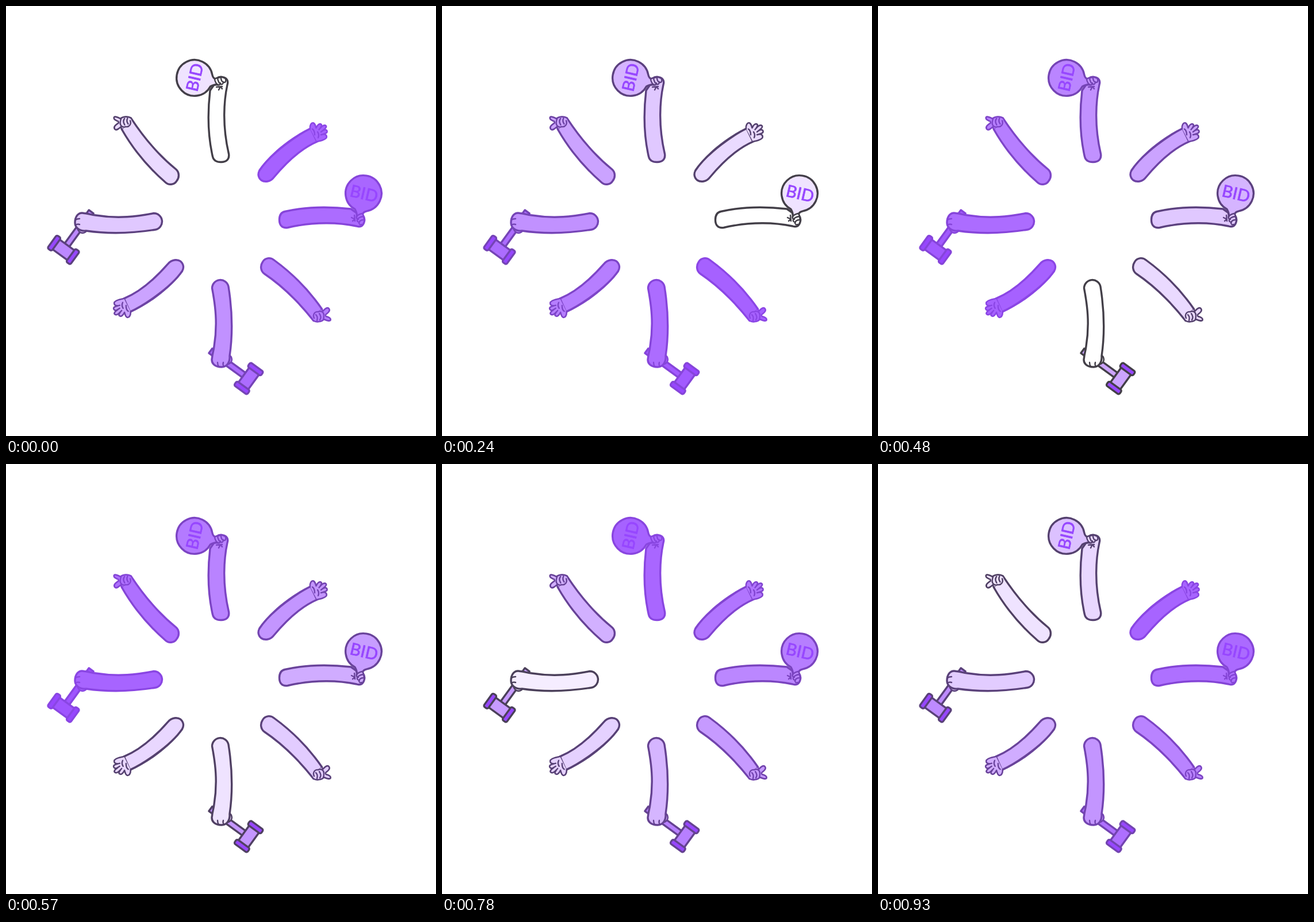
Write an HTML page that moves like this. It is 748x748 px and loops after 960 ms.

```html
<!DOCTYPE html>
<html lang="en">
<head>
<meta charset="utf-8">
<title>Bidding arms loader</title>
<style>
  html, body { margin: 0; width: 100%; height: 100%; overflow: hidden; background: #fff; }
  svg { display: block; width: 100vw; height: 100vh; }
  .skin, .disc, .wood, .cap, .line {
    stroke: var(--ink); stroke-width: 3.4; stroke-linejoin: round; stroke-linecap: round;
  }
  .skin { fill: var(--skin); }
  .disc { fill: var(--disc); }
  .wood { fill: var(--wood); }
  .cap { fill: #9747ff; }
  .line { fill: none; stroke-width: 2.4; }
  .hand { stroke-width: 2.6; }
  text { font: 29px Lato, sans-serif; fill: #9747ff; stroke: #9747ff; stroke-width: .8; text-anchor: middle; }
</style>
</head>
<body>
<svg viewBox="0 0 748 748">
  <defs>
    <g id="paddle">
      <path class="skin" d="M359.5 262C351 225 350 190 355 147L362 137C360 127 370 121.500 378 124C385 126 387 131 385 137C379 165 376 208 387.500 257C389 266 384 271.500 374 271.500C366 271.500 361 269 359.500 262Z"/>
      <path class="disc" d="M358.800 119.500C359.500 123 361 126 365 127L369 137C364 136 359 138 355.500 140A31.300 31.300 0 1 1 358.800 119.500Z"/>
      <path class="skin" style="stroke:none" d="M363 128L368 126L374 125L382 128C383 132 381 134 378 135C374 138 370 139 367 136Z"/>
      <path class="line" d="M363 128C364 132 366 136 369 137C372 138 373 136 373 134M363 128C364 125 367 125 368 126M368 126C369 131 371 135 374 136C377 137 378 134 378 132M368 126C370 124 373 124 374 125M374 125C374 129 376 132 379 133C382 133 383 131 382 128M366 141L376 140M370 146L373 140L376 144"/>
      <text x="328" y="134.500" transform="rotate(-77 328 124)">BID</text>
    </g>

    <g id="palm">
      <path class="skin" d="M441 286C459 261 489 233 530 213"/>
      <path class="skin" d="M530 213C511 222 461 255 441 286C438 291 438 298 444 303C450 307 460 306 466 298C486 274 511 249 541 236Z"/>
      <path class="skin hand" d="M529 213.500C528 208 531 202 535 203.500C538 205 538 208 539.500 212C541 208 545 203 548.500 206C550 208 548 210 547 212C550 208 555 205.500 557 209C558 212 554 214 552 216C556 214 559 216 558.500 219C558 222 554 222 552 223C556 223 558.500 225 557.500 229C556 232 551 233 549 234C546 235 544 235 541 236"/>
      <path class="line" d="M547 212L544.500 215M552 216L548 219M552 223L548 224M533 214C536 216 537 220 537 224M542 219C544 222 545 225 543 229"/>
    </g>

    <g id="point">
      <path class="skin" d="M467 442.500C495 463 526 493 549.500 527L535 547.500C514 521 484 489 449 465.500C443 461 442 452 446 446C450 437.500 460 436.500 467 442.500Z"/>
      <path class="skin hand" d="M549.500 527L551 531C554 528 558 523 561.500 526C565 530 560 534 556 537C556 539 556 540 557 540C561 541 565.500 543 564.500 546.500C563 549 558 547 553 545C550 549 540 551 535 547.500"/>
      <path class="skin" style="stroke:none" d="M532 540L548 528L553 536L551 544L541 547.500L535 546Z"/>
      <path class="line" d="M536 543C533 537 537 531 543 532C548 529 553 533 553 538C553 541 553 543 552 545M539 537C542 540 542 544 541 547M545 535C548 539 548 543 546 546"/>
    </g>

    <g id="gavel">
      <g transform="translate(422.200 648) rotate(36)">
        <rect class="wood" x="-82" y="-5" width="74" height="10"/>
        <rect class="wood" x="-10.500" y="-17" width="21" height="34"/>
        <rect class="cap" x="-14" y="-24.600" width="28" height="9" rx="3"/>
        <rect class="cap" x="-14" y="15.600" width="28" height="9" rx="3"/>
      </g>
      <path class="skin hand" d="M386 606C395 610 395 619 387 623Z"/>
      <path class="skin" d="M358.500 491C364 520 368.500 552 362 592C361 601 359 605 358.500 612C356 622 364 628 375 628C383 628 390 621 389 609C394 575 394.500 535 387 488A14.400 14.400 0 0 0 358.500 491Z"/>
      <path class="line" d="M368 620C368 623 368.500 625 370 627M378 620C377 623 377.500 625 379 627"/>
    </g>
  </defs>
</svg>
<script>
  const LOOP = 960, STEP = 120, TICK = 30;
  const svg = document.querySelector('svg');
  const tint = [151, 71, 255];
  const base = {
    skin: [255, 255, 255],
    ink: [67, 63, 72],
    disc: [239, 227, 255],
    wood: [204, 164, 255]
  };
  // Tint strength after each step since the arm was lit
  const levels = [0, .2, .3, .5, .6, .7, .8, .86, 0];

  // Clockwise from the top
  const arms = [
    ['paddle', ''],
    ['palm', ''],
    ['paddle', 'rotate(90 374.5 372.5)'],
    ['point', ''],
    ['gavel', ''],
    ['palm', 'translate(294.5 455) rotate(181.4) translate(-453 -292)'],
    ['gavel', 'rotate(90 373 375)'],
    ['point', 'translate(286.8 297) rotate(185) translate(-457 -452)']
  ].map(([id, transform]) => {
    const use = document.createElementNS('http://www.w3.org/2000/svg', 'use');
    use.setAttribute('href', '#' + id);
    use.setAttribute('transform', transform);
    return svg.appendChild(use);
  });

  function level(age) {
    const p = age / STEP, i = Math.floor(p);
    return levels[i] + (levels[i + 1] - levels[i]) * (p - i);
  }

  function mix(color, k) {
    return `rgb(${color.map((c, i) => Math.round(c + (tint[i] - c) * k))})`;
  }

  function draw(time) {
    const t = Math.floor((time % LOOP) / TICK) * TICK;
    arms.forEach((arm, i) => {
      const k = level((t - i * STEP + LOOP) % LOOP);
      for (const name in base) arm.style.setProperty('--' + name, mix(base[name], k));
    });
  }

  const start = performance.now();
  function loop() {
    draw(performance.now() - start);
    requestAnimationFrame(loop);
  }
  loop();
</script>
</body>
</html>
```
